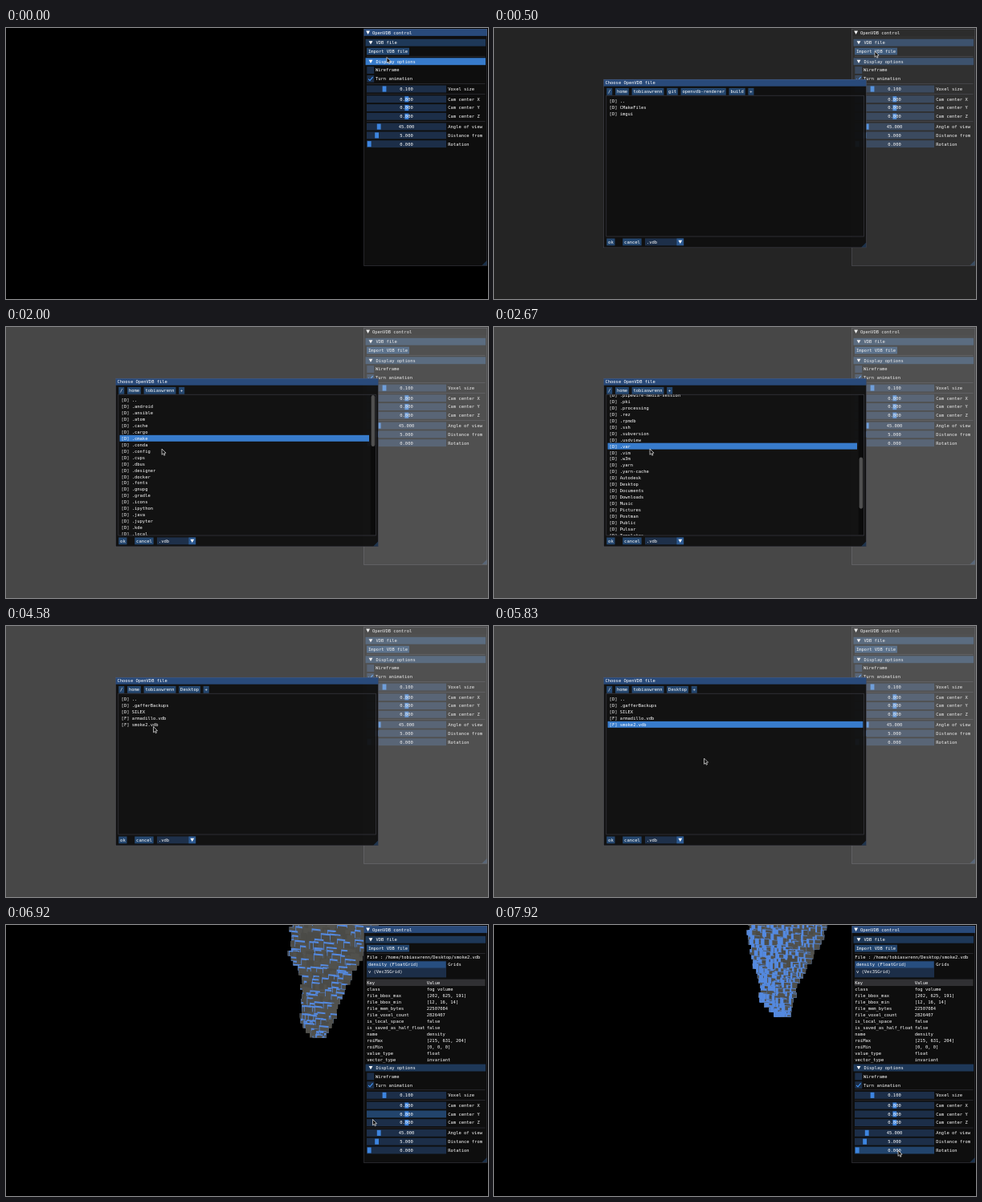
These frames come from a looping animation (600 px wide and 338 px high, 8000 ms). An HTML page with a canvas:

```html
<!DOCTYPE html>
<html lang="en">
<head>
<meta charset="utf-8">
<title>OpenVDB control</title>
<style>
html, body { margin: 0; width: 100%; height: 100%; overflow: hidden; background: #000; }
canvas { display: block; width: 600px; height: 338px; }
</style>
</head>
<body>
<canvas id="stage" width="600" height="338"></canvas>
<script>
const ctx = document.getElementById('stage').getContext('2d');
const STEP = 1000 / 12, STEPS = 96;
const UNIT = 600 / 1280, CHAR = 7 * UNIT, ROW = 17 * UNIT;
const USER = 'tobiaswrenn';

const C = {
  text: '#fff', window: 'rgba(15,15,15,.94)', title: '#294a7a', titleIdle: '#0a0a0a',
  border: 'rgba(110,110,128,.5)', header: 'rgba(66,150,250,.31)', hover: 'rgba(66,150,250,.8)',
  button: 'rgba(66,150,250,.4)', active: '#4296fa', frame: 'rgba(41,74,122,.54)', grab: '#3d85e0',
  voxel: '#51514d', voxelDim: '#4b4b47', voxelSide: '#5489df'
};

// Steps at which the state changes
const OPEN = 6, HOME = 18, DESKTOP = 44, CLICK = 61, LOADED = 73;

const path = [
  [-1, 475, 42], [0, 474, 36.5], [3, 474, 29], [6, 474, 29], [13, 219, 80], [14, 213.5, 79.5],
  [16, 187, 79.5], [18, 187, 79.5], [24, 194, 152], [35, 194, 152], [41, 190, 165], [48, 190, 165],
  [54, 185, 129], [55, 183.5, 125.5], [58, 182, 123.5], [64, 182, 123.5], [67, 258, 164],
  [69, 258, 164], [70, 261.5, 165], [74, 261.5, 165], [82, 452, 238], [83, 456.5, 242.5],
  [92, 499, 252], [94, 503, 280], [95, 503, 281]
];

const dirs = names => names.split(' ').map(n => '[D] ' + n);
const folders = {
  build: dirs('.. CMakeFiles imgui'),
  home: dirs('.. .android .ansible .atom .cache .cargo .cmake .conda .config .cups .dbus .designer ' +
    '.docker .fonts .gnupg .gradle .icons .ipython .java .jupyter .kde .local .mozilla .npm .nv ' +
    '.oh-my-zsh .pipewire-media-session .pki .processing .rez .rpmdb .ssh .subversion .usdview .var ' +
    '.vim .w3m .yarn .yarn-cache Autodesk Desktop Documents Downloads Music Pictures Postman Public ' +
    'Pulsar Templates Videos bin build cmake dev git lib packages perl5 scripts tmp'),
  desktop: [...dirs('.. .gafferBackups SILEX'), '[F] armadillo.vdb', '[F] smoke2.vdb']
};

const gridInfo = [
  ['class', 'fog volume'], ['file_bbox_max', '[202, 625, 191]'], ['file_bbox_min', '[12, 16, 14]'],
  ['file_mem_bytes', '22507084'], ['file_voxel_count', '2826407'], ['is_local_space', 'false'],
  ['is_saved_as_half_float', 'false'], ['name', 'density'], ['roiMax', '[215, 631, 204]'],
  ['roiMin', '[0, 0, 0]'], ['value_type', 'float'], ['vector_type', 'invariant']
];

// label, centre y, value, grab x
const sliders = [
  ['Voxel size', 76, '0.100', 471], ['Cam center X', 88.7, '0.000', 498.8],
  ['Cam center Y', 99.5, '0.000', 498.8], ['Cam center Z', 110.2, '0.000', 498.8],
  ['Angle of view', 123, '45.000', 464.2], ['Distance from', 133.8, '5.000', 461.6],
  ['Rotation', 144.6, '0.000', 452.2]
];

const mix = (a, b, t) => a + (b - a) * t;
const clamp = (v, a, b) => Math.max(a, Math.min(b, v));
const inside = (p, x, y, w, h) => p[0] >= x && p[0] < x + w && p[1] >= y && p[1] < y + h;
const rand = (a, b) => {
  const s = Math.sin(a * 12.9898 + b * 78.233) * 43758.5453;
  return s - Math.floor(s);
};

function cursorAt(k) {
  const i = clamp(path.findIndex(p => p[0] >= k), 1, path.length - 1);
  const [a, b] = [path[i - 1], path[i]];
  const t = clamp((k - a[0]) / (b[0] - a[0]), 0, 1);
  return [mix(a[1], b[1], t), mix(a[2], b[2], t)];
}

function box(x, y, w, h, color) {
  ctx.fillStyle = color;
  ctx.fillRect(x, y, w, h);
}

function outline(x, y, w, h) {
  ctx.strokeStyle = C.border;
  ctx.lineWidth = 0.6;
  ctx.strokeRect(x, y, w, h);
}

function poly(points, color) {
  ctx.beginPath();
  points.forEach(([x, y]) => ctx.lineTo(x, y));
  ctx.closePath();
  ctx.fillStyle = color;
  ctx.fill();
}

function text(str, x, y) {
  ctx.save();
  ctx.translate(x, y + 1.9);
  ctx.scale(UNIT, UNIT);
  ctx.font = '11.63px "DejaVu Sans Mono", "Liberation Mono", monospace';
  ctx.fillStyle = C.text;
  ctx.fillText(str, 0, 0);
  ctx.restore();
}

const arrowDown = (x, y) => poly([[x - 2.4, y - 2], [x + 2.4, y - 2], [x, y + 2.3]], C.text);
const grip = (x, y) => poly([[x, y], [x - 6, y], [x, y - 6]], 'rgba(66,150,250,.25)');
const rule = y => box(449, y - 0.25, 147.5, 0.5, C.border);

function header(label, y, mouse) {
  const over = inside(mouse, 447.5, y - 4.4, 149.5, 8.9);
  box(447.5, y - 4.4, 149.5, 8.9, over ? C.hover : C.header);
  arrowDown(454, y);
  text(label, 460.5, y);
}

function button(label, x, y, mouse) {
  const w = label.length * CHAR + 3.75;
  box(x, y - 4.3, w, 8.8, inside(mouse, x, y - 4.3, w, 8.8) ? C.active : C.button);
  text(label, x + 1.9, y);
  return x + w + 3.75;
}

function checkbox(label, y, on) {
  box(449.3, y - 4.4, 8.9, 8.9, C.frame);
  if (on) {
    ctx.beginPath();
    ctx.moveTo(451, y + 0.3);
    ctx.lineTo(453, y + 2.2);
    ctx.lineTo(456.6, y - 2.2);
    ctx.strokeStyle = C.active;
    ctx.lineWidth = 1.1;
    ctx.stroke();
  }
  text(label, 460, y);
}

function slider([label, y, value, grab], dy, mouse) {
  y += dy;
  box(449, y - 4.4, 99, 8.9, inside(mouse, 449, y - 4.4, 99, 8.9) ? C.button : C.frame);
  box(grab - 2.4, y - 3.5, 4.8, 7.1, C.grab);
  text(value, 498.5 - value.length * CHAR / 2, y);
  text(label, 550.3, y);
}

function gridPanel() {
  text(`File : /home/${USER}/Desktop/smoke2.vdb`, 449.3, 40.5);
  box(449, 44.8, 99, 20.6, C.frame);
  box(449.5, 45.5, 98, 8, C.header);
  text('density (FloatGrid)', 451, 49.5);
  text('v (Vec3SGrid)', 451, 57.7);
  text('Grids', 550.3, 49.5);
  box(449, 67.6, 147.5, 8.4, '#303033');
  text('Key', 449.3, 72);
  text('Value', 523.8, 72);
  gridInfo.forEach(([key, value], i) => {
    const y = 80 + i * 7.98;
    text(key, 449.3, y);
    text(value, 523.8, y);
  });
}

function controlPanel(k, mouse, modal) {
  const loaded = k >= LOADED, dy = loaded ? 136.3 : 0;
  box(445.5, 1, 153.5, 295.5, C.window);
  box(445.5, 1, 153.5, 8.9, modal ? C.titleIdle : C.title);
  outline(445.5, 1.2, 153.3, 295.3);
  arrowDown(450.6, 5.6);
  text('OpenVDB control', 456, 5.6);
  header('VDB file', 18.2, mouse);
  button('Import VDB file', 449, 29, mouse);
  rule(35.5);
  if (loaded) gridPanel();
  header('Display options', 41.7 + dy, mouse);
  checkbox('Wireframe', 52.5 + dy, false);
  checkbox('Turn animation', 63.3 + dy, true);
  [69.5, 82.4, 116.7].forEach(y => rule(y + dy));
  sliders.forEach(s => slider(s, dy, mouse));
  grip(598.5, 296);
}

function fileList(k, mouse) {
  const home = k >= HOME && k < DESKTOP;
  const rows = k < HOME ? folders.build : home ? folders.home : folders.desktop;
  const scroll = home ? clamp(k - 25, 0, 8) * 65 * UNIT : 0;
  const right = home ? 452 : 459.3;
  outline(139.8, 84.2, 320.8, 175.8);
  ctx.save();
  ctx.beginPath();
  ctx.rect(140, 84.5, 320.4, 175.2);
  ctx.clip();
  rows.forEach((name, i) => {
    const y = 91 + i * ROW - scroll;
    if (y < 78 || y > 266) return;
    if (inside(mouse, 141.5, y - 4, right - 141.5, ROW) && mouse[1] > 84.5) {
      box(141.5, y - 4, right - 141.5, ROW, k === CLICK ? C.active : C.hover);
    }
    text(name, 143.6, y);
  });
  if (home) {
    const content = rows.length * ROW, thumb = 174 * 176 / content;
    box(453.8, 85, 6.4, 174, 'rgba(5,5,5,.53)');
    ctx.beginPath();
    ctx.roundRect(454.6, 85 + (174 - thumb) * scroll / (content - 176), 4.6, thumb, 2.3);
    ctx.fillStyle = '#4f4f4f';
    ctx.fill();
  }
  ctx.restore();
}

function dialog(k, mouse) {
  box(136.5, 64, 327, 210, C.window);
  box(136.5, 64, 327, 8.7, C.title);
  outline(136.6, 64.2, 326.8, 209.6);
  text('Choose OpenVDB file', 138.5, 68.3);
  const crumbs = ['/', 'home', USER];
  if (k < HOME) crumbs.push('git', 'openvdb-renderer', 'build');
  if (k >= DESKTOP) crumbs.push('Desktop');
  [...crumbs, '+'].reduce((x, name) => button(name, x, 79.2, mouse), 140.2);
  fileList(k, mouse);
  button('ok', 140.2, 266.8, mouse);
  button('cancel', 160.2, 266.8, mouse);
  box(188, 262.4, 48.2, 8.9, C.frame);
  box(227.4, 262.4, 8.8, 8.9, C.button);
  text('.vdb', 190, 266.8);
  arrowDown(231.8, 266.8);
  grip(463.2, 273.6);
}

// Cloud outline: left and right edges by height above the tip, for three poses
const levels = [0, 5, 20, 40, 55, 75, 90, 105, 130, 150, 170];
const poses = [
  { left: [396, 388, 385, 381, 379, 382, 381, 372, 363, 363, 372],
    right: [407, 412, 427, 440, 449, 458, 466, 475, 490, 495, 500] },
  { left: [388, 374, 367, 367, 369, 368, 360, 352, 354, 358, 362],
    right: [399, 402, 408, 413, 420, 429, 437, 445, 460, 470, 480] },
  { left: [357, 345, 331, 330, 327, 320, 318, 316, 315, 314, 313],
    right: [371, 372, 373, 377, 387, 396, 406, 411, 416, 420, 425] }
];

function edge(points, d) {
  const i = clamp(levels.findIndex(v => v >= d), 1, levels.length - 1);
  return mix(points[i - 1], points[i], clamp((d - levels[i - 1]) / (levels[i] - levels[i - 1]), 0, 1));
}

function cloud(k) {
  const late = k > 83, n = late ? 1 : 0;
  const t = late ? (k - 83) / 12 : (k - 74) / 9;
  const tween = v => mix(v[n], v[n + 1], t);
  const side = (name, d) => mix(edge(poses[n][name], d), edge(poses[n + 1][name], d), t);
  const tip = tween([165, 140, 114]), slope = tween([0.25, 0.1, 0.08]);
  const width = tween([12, 10, 7]), height = tween([9, 8, 8]);
  const sideX = tween([0, 0.8, 3.6]), sideY = tween([2.2, 2.2, 1]);
  const lit = tween([0.3, 0.32, 0.8]), bias = tween([0, 0.2, 1]);
  const slant = (x, y, w, h, color) =>
    poly([[x, y], [x + w, y + w * slope], [x + w, y + w * slope + h], [x, y + h]], color);

  // Stepped silhouette
  ctx.save();
  ctx.beginPath();
  for (let i = 0; i * 6 < tip + 6; i++) {
    const d = i * 6 + 3;
    const l = side('left', d) + rand(i, 1) * 5 - 2.5;
    const r = side('right', d) + rand(i, 2) * 5 - 2.5;
    ctx.rect(l, tip - d - 3, r - l, 6.5);
  }
  ctx.fillStyle = C.voxel;
  ctx.fill();
  ctx.clip();

  // Voxels from the top down, each with a lit side behind its front face
  for (let j = 36; j >= -1; j--) {
    const d = j * 5, y0 = tip - d - height;
    const l = side('left', d) - 3, r = side('right', d) + 3;
    for (let c = 0; c < 14; c++) {
      const u = (c + rand(j, c + 5)) / 14;
      const x = mix(l, r, u) - width / 2, y = y0 + rand(c, j) * 5;
      const w = width * (0.6 + 0.7 * rand(c + 9, j));
      const sx = sideX * (1 + bias * (0.5 - u));
      if (rand(j + 40, c) < lit) slant(x - sx, y - sideY, w + sx, height + sideY, C.voxelSide);
      slant(x, y, w, height, rand(c + 3, j) < 0.3 ? C.voxelDim : C.voxel);
    }
  }
  ctx.restore();
}

function pointer([x, y]) {
  const shape = [[0, 0], [0, 7.3], [1.7, 5.8], [2.8, 8.2], [4, 7.6], [2.9, 5.3], [5.1, 5.1]];
  poly(shape.map(([px, py]) => [x + px, y + py]), '#111');
  ctx.strokeStyle = '#e8e8e8';
  ctx.lineWidth = 0.7;
  ctx.stroke();
}

function draw(k) {
  const modal = k >= OPEN && k < LOADED;
  // Hover trails the pointer by one step and freezes while loading
  const mouse = cursorAt(k > CLICK && k < LOADED ? CLICK : k - 1);
  const nowhere = [-1, -1];
  box(0, 0, 600, 338, '#000');
  if (k >= LOADED) cloud(k);
  controlPanel(k, modal ? nowhere : mouse, modal);
  if (modal) {
    box(0, 0, 600, 338, `rgba(204,204,204,${0.35 * Math.min(1, (k - OPEN + 1) / 2)})`);
    dialog(k, mouse);
  }
  pointer(cursorAt(k));
}

const start = performance.now();
function tick() {
  const time = Math.max(0, performance.now() - start);
  draw(Math.floor((time + 4) / STEP) % STEPS);
  requestAnimationFrame(tick);
}
tick();
</script>
</body>
</html>
```
